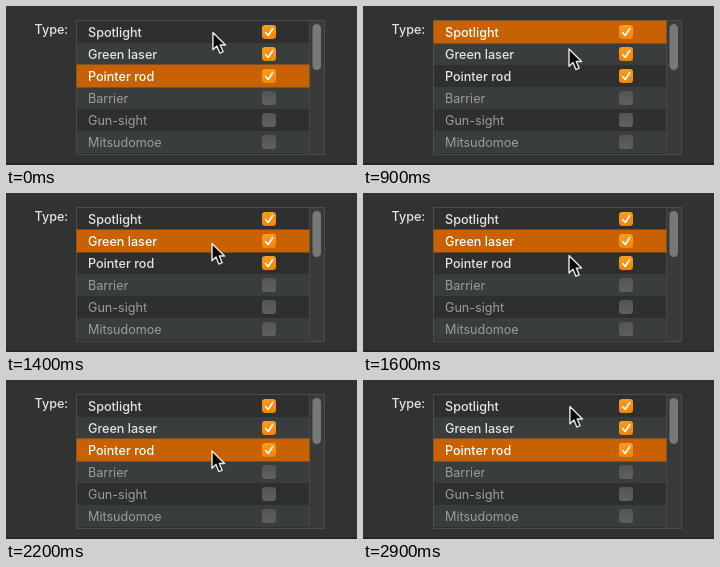
Recreate the animation shown at these times as an HTML page. Size 351 px wide and 159 px high, loop 3 s.

```html
<!DOCTYPE html>
<html lang="en">
<head>
<meta charset="utf-8">
<style>
  html, body { margin: 0; width: 100%; height: 100%; overflow: hidden; background: #303332; }
  svg { display: block; width: 100vw; height: 100vh; }
  text { font: 500 12.6px Inter, "Open Sans", sans-serif; fill: #e3e4e4; }
  .off { font-weight: 400; fill: #9a9d9c; }
  .active { fill: #fff; }
</style>
</head>
<body>
<svg viewBox="0 0 351 159">
  <defs>
    <linearGradient id="on" x2="0" y2="1">
      <stop stop-color="#f99d22"/><stop offset="1" stop-color="#f28408"/>
    </linearGradient>
    <linearGradient id="empty" x2="0" y2="1">
      <stop stop-color="#525554"/><stop offset="1" stop-color="#5e6160"/>
    </linearGradient>
  </defs>
  <rect width="351" height="159" fill="#303332"/>
  <rect y="157" width="351" height="2" fill="#252727"/>
  <text x="28.5" y="28">Type:</text>
  <rect x="70.5" y="14.5" width="248" height="134" fill="#2d302f" stroke="#4a4d4c"/>
  <g id="stripes"></g>
  <rect x="304" y="15" width="14" height="133" fill="#383b3a"/>
  <path d="M303.5 15V148" stroke="#454847"/>
  <rect x="306.5" y="18" width="8.5" height="46" rx="4.25" fill="#767978"/>
  <rect id="selection" x="70.5" width="233" height="23" fill="#c86100"/>
  <g id="items"></g>
  <path id="cursor" d="M0 0V17.3L4 13.6L6.9 20.6L10.2 19.2L7.3 12.5H12.6Z"
        fill="#0a0a0a" stroke="#e6e6e6" stroke-width="1.4" stroke-linejoin="round"/>
</svg>
<script>
  const NS = "http://www.w3.org/2000/svg";
  const LOOP = 3000, STEP = 100, ROW = 22, TOP = 15;
  const byId = id => document.getElementById(id);
  const selection = byId("selection"), cursor = byId("cursor");

  function add(parent, tag, attrs) {
    const node = document.createElementNS(NS, tag);
    for (const key in attrs) node.setAttribute(key, attrs[key]);
    return parent.appendChild(node);
  }

  const names = ["Spotlight", "Green laser", "Pointer rod", "Barrier", "Gun-sight", "Mitsudomoe"];
  const labels = names.map((name, i) => {
    const y = TOP + i * ROW, checked = i < 3, items = byId("items");
    if (i % 2) add(byId("stripes"), "rect", { x: 71, y, width: 232, height: ROW, fill: "#3a3d3d" });
    const label = add(items, "text", { x: 82, y: y + 16, class: checked ? "" : "off" });
    label.textContent = name;
    add(items, "rect", { x: 256, y: y + 4, width: 14, height: 14, rx: 3.2,
      fill: checked ? "url(#on)" : "url(#empty)" });
    if (checked) {
      add(items, "path", { d: `M259.6 ${y + 11.5}l2.6 3 4.4 -6.8`, fill: "none", stroke: "#fff",
        "stroke-width": 1.6, "stroke-linecap": "round", "stroke-linejoin": "round" });
    }
    return label;
  });

  // Each cursor move eases out; a higher power brakes harder.
  const moves = [
    { start: 400, end: 1300, from: 25, to: 50.5, power: 1.5 },
    { start: 1500, end: 2000, from: 50.5, to: 71, power: 4 },
    { start: 2200, end: 2900, from: 71, to: 26.5, power: 1.75 }
  ];

  function cursorY(t) {
    const move = moves.filter(m => t >= m.start).pop();
    if (!move) return moves[2].to;
    const k = Math.min(1, (t - move.start) / (move.end - move.start));
    return move.from + (move.to - move.from) * (1 - (1 - k) ** move.power);
  }

  function selectedAt(t) {
    if (t < 400 || t >= 2200) return 2;
    return t < 1400 ? 0 : 1;
  }

  function draw(time) {
    const t = Math.floor((time % LOOP) / STEP) * STEP;
    const selected = selectedAt(t), y = cursorY(t);
    selection.setAttribute("y", TOP + selected * ROW - 0.5);
    labels.forEach((label, i) => label.classList.toggle("active", i === selected));
    // The tip drifts one pixel left on its way down.
    const x = 207 - Math.min(1, (y - 25) / 18);
    cursor.setAttribute("transform", `translate(${x} ${y})`);
  }

  const start = performance.now();
  function tick() {
    draw(performance.now() - start);
    requestAnimationFrame(tick);
  }
  tick();
</script>
</body>
</html>
```
